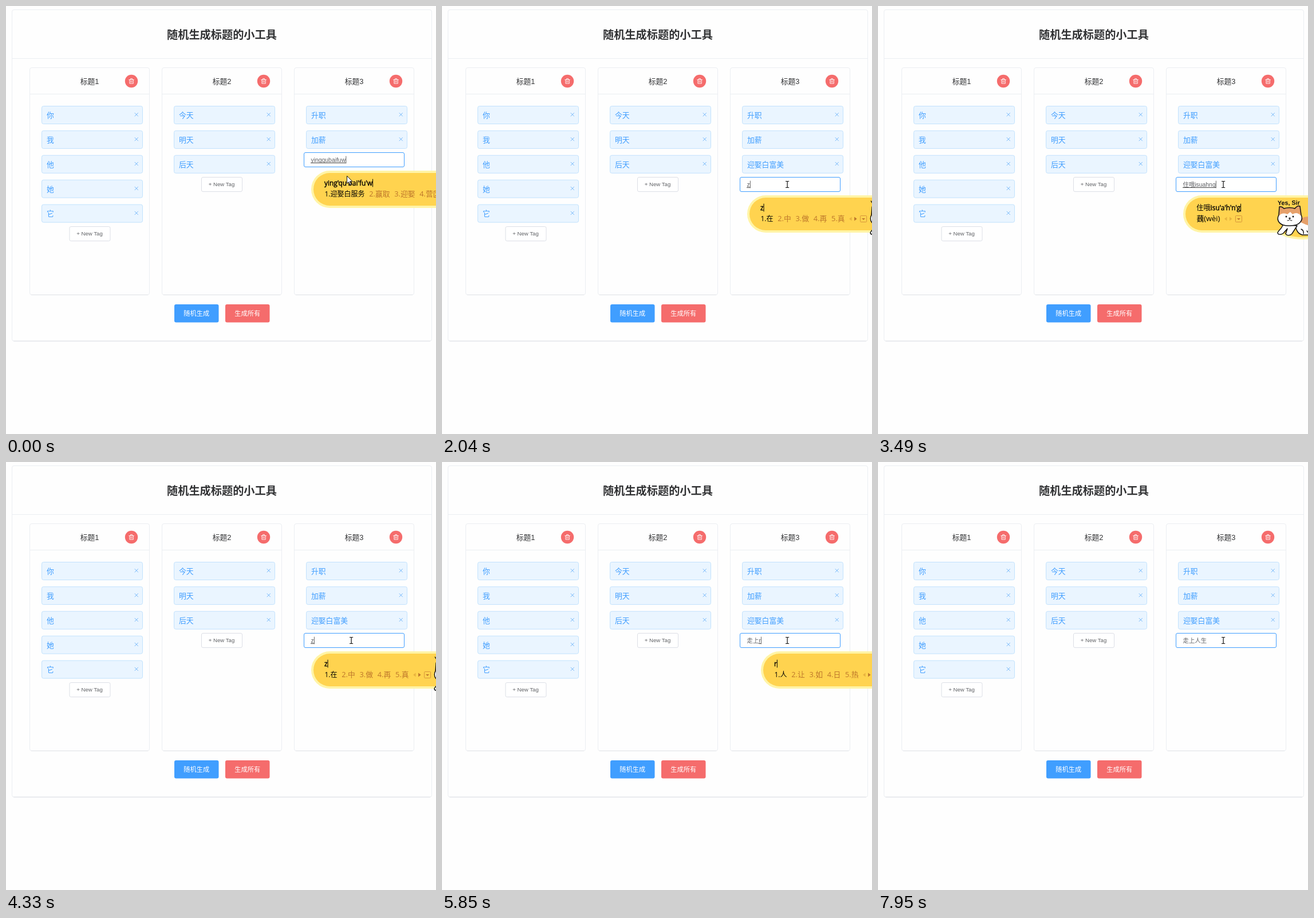
Recreate the animation shown at these times as an HTML page. Size 751 by 746 pixels, loop 8 s.

```html
<!DOCTYPE html>
<html lang="zh">
<head>
<meta charset="utf-8">
<style>
html, body { margin: 0; width: 100%; height: 100%; overflow: hidden; background: #fefefe; }
svg { display: block; width: 751px; height: 746px; }
text { font-family: "Liberation Sans", "Noto Sans CJK SC", "Noto Sans CJK", sans-serif; white-space: pre; }
.ime { font-family: "Open Sans", "Noto Sans CJK SC", "Noto Sans CJK", sans-serif; }
</style>
</head>
<body>
<svg viewBox="0 0 751 746"><g id="page"></g><g id="live"></g></svg>
<script>
const LOOP = 8000, BLUE = '#409eff', RED = '#f56c6c', GREY = '#606266', BROWN = '#bd762b';
const SANS = '"Liberation Sans","Noto Sans CJK SC","Noto Sans CJK",sans-serif';
const IME = '"Open Sans","Noto Sans CJK SC","Noto Sans CJK",sans-serif';

const pen = document.createElement('canvas').getContext('2d');
const width = (s, size, font) => (pen.font = `${size}px ${font}`, pen.measureText(s).width);
const mix = (a, b, k) => `color-mix(in srgb, ${b} ${k * 100}%, ${a})`;

const rect = (x, y, w, h, r, fill, stroke = 'none') =>
  `<rect x="${x}" y="${y}" width="${w}" height="${h}" rx="${r}" style="fill:${fill};stroke:${stroke}"/>`;
const text = (s, x, y, size, fill, more = '') =>
  `<text x="${x}" y="${y}" font-size="${size}" style="fill:${fill}" ${more}>${s}</text>`;
const path = (d, fill, stroke = 'none', w = 1) =>
  `<path d="${d}" fill="${fill}" stroke="${stroke}" stroke-width="${w}" stroke-linecap="round" stroke-linejoin="round"/>`;
const ellipse = (x, y, rx, ry, fill) => `<ellipse cx="${x}" cy="${y}" rx="${rx}" ry="${ry}" fill="${fill}"/>`;
const mid = 'text-anchor="middle"';

function card(x, y, w, h, head) {
  return rect(x, y, w, h, 3.5, 'none', '#ebeef2') +
    path(`M${x + 3} ${y + h}h${w - 6}`, 'none', '#dfe1e5') +
    path(`M${x} ${head}h${w}`, 'none', '#ebeef2');
}

function tag(label, x, row) {
  const y = 174.5 + row * 42.9;
  return rect(x, y, 176, 31, 3, '#eaf5ff', '#c2e2fd') +
    text(label, x + 8.5, y + 20.3, 12.8, BLUE) +
    path(`M${x + 162.5} ${y + 12}l5.5 5.5m0-5.5l-5.5 5.5`, 'none', '#69b1fa', .9);
}

function newTag(x, y, hover = 0) {
  return rect(x, y, 71, 25, 2.5, mix('#ffffff', '#ecf5ff', hover), mix('#dcdfe6', '#c6e2ff', hover)) +
    text('+ New Tag', x + 12.3, y + 15.8, 9.6, mix(GREY, BLUE, hover));
}

function column(i, tags) {
  const x = 41.5 + i * 231;
  return card(x, 107.5, 209, 396, 153.5) +
    text('标题' + (i + 1), x + 104.5, 135.6, 12.8, '#303133', mid) +
    `<circle cx="${x + 177.5}" cy="131" r="11.2" fill="${RED}"/>` +
    path(`M${x + 173.3} 128.5h8.6m-5.8 0v-2h3v2m-4.7 0v6.6h6.4v-6.6m-4.4 2v2.6m2.2-2.6v2.6`, 'none', '#fff', .9) +
    tags.map((s, row) => tag(s, x + 21, row)).join('');
}

page.innerHTML = card(10.5, 6.5, 733, 577.5, 91.5) +
  text('随机生成标题的小工具', 377, 57, 19.2, '#303133', mid + ' font-weight="700"') +
  column(0, ['你', '我', '他', '她', '它']) + newTag(111, 384.5) +
  column(1, ['今天', '明天', '后天']) + newTag(341.5, 298.5) +
  column(2, ['升职', '加薪']) +
  rect(294, 520, 77.5, 31.5, 3, BLUE) + text('随机生成', 332.7, 540, 11.2, '#fff', mid) +
  rect(383, 520, 77.5, 31.5, 3, RED) + text('生成所有', 421.7, 540, 11.2, '#fff', mid);

// Mascot at the right end of the input-method bubble
const dog =
  path('M728 378C738 371 746 368 762 368V399H741C734 397 730 392 728 378Z', '#fff', '#111', 1.5) +
  path('M731 374C740 368 748 366 762 367V384C750 384 742 378 731 374Z', '#e6a06a') +
  path('M707 381C706 388 700 390 698 395C698 399 704 399 708 396L715 388L712 397C714 401 720 400 723 397L732 383Z', '#fff', '#111', 1.5) +
  path('M700 364L701 350Q705 349 709 353Q719 350 728 353Q733 347 737 349L739 364C743 372 738 383 720 383C701 384 695 374 700 364Z', '#fff') +
  path('M700 364L701 350Q705 349 709 353Q719 350 728 353Q733 347 737 349L739 366Q732 358 724 363L720 359L715 363Q706 359 700 366Z', '#e6a06a') +
  path('M700 364L701 350Q705 349 709 353Q719 350 728 353Q733 347 737 349L739 364C743 372 738 383 720 383C701 384 695 374 700 364Z', 'none', '#111', 1.5) +
  ellipse(713, 367, 1.4, 1.6, '#111') + ellipse(725, 367, 1.4, 1.6, '#111') + ellipse(719, 370, 1.8, 1.3, '#111') +
  path('M715 374Q717 375 719 372Q721 375 723 374', 'none', '#111') +
  path('M739 389Q744 391 743 397M749 392L755 399', 'none', '#111', 1.4) +
  text('Yes, Sir', 698, 347, 10.8, '#111',
    'transform="rotate(-1 698 347)" font-weight="700" style="font-family:\'DejaVu Sans Mono\',monospace"');

function bubble(left, top, pinyin, words) {
  const x0 = left + 23, single = words.length < 2;
  const [, done, rest] = pinyin.match(/^([^a-z]*)(.*)$/);
  let x = x0 + .5, row = '';
  words.forEach((word, i) => {
    const size = i || single ? 12.8 : 12, person = word.endsWith('@');
    const label = (single ? '' : i + 1 + '.') + word.replace('@', '');
    row += text(label, x, top + 45.3, size, i ? BROWN : '#000', 'class="ime"');
    x += width(label, size, IME);
    if (person) {
      row += ellipse(x + 4, top + 35, 2, 2.2, BROWN) + path(`M${x + .5} ${top + 40}q0-3 3.5-3t3.5 3z`, BROWN);
      x += 7.5;
    }
    x += 7.7;
  });
  const y = top + 41, pale = '#e8b33f', next = single ? pale : BROWN;
  row += path(`M${x + 4.5} ${y - 3.5}v7l-4.5-3.5z`, pale) +
    path(`M${x + 9} ${y - 3.5}v7l4.5-3.5z`, next) +
    rect(x + 19.5, y - 5.5, 11, 11, 1, 'none', '#d6963a') +
    path(`M${x + 22} ${y - 1}h6l-3 3z`, BROWN);
  const shift = Math.max(0, x + 36 - 697), doneW = width(done, 12.4, IME);
  const end = x0 + doneW + width(rest, 11.8, IME) + .5;
  const spot = (rx, ry, fill) => ellipse(742 + shift, top + 53, rx, ry, fill);
  return rect(left, top, 320, 65, 32.5, '#fff4a6') + spot(50, 24, '#fff4a6') +
    rect(left + 4, top + 4, 312, 57, 28.5, '#ffd34f') + spot(46, 20, '#ffd34f') +
    text(done, x0, top + 25.5, 12.4, '#000', 'class="ime"') +
    text(rest, x0 + doneW, top + 25.5, 11.8, '#000', 'class="ime" stroke="#000" stroke-width=".4"') +
    path(`M${end} ${top + 15}v13`, 'none', '#000') + row +
    `<g transform="translate(${shift} ${top - 330})">${dog}</g>`;
}

function field(y, typed, pinyin, focus) {
  const comp = pinyin.replace(/'/g, ''), x = 532.5;
  const a = x + width(typed, 10.4, SANS), b = a + width(comp, 10.4, SANS);
  return rect(520.5, y + .5, 175, 25, 2.5, '#fff', mix('#dcdfe6', BLUE, focus)) +
    text(typed, x, y + 16.7, 10.4, GREY) + text(comp, a, y + 16.7, 10.4, GREY) +
    (comp && path(`M${a} ${y + 18.5}H${b}`, 'none', '#444') + path(`M${b + .7} ${y + 7}v12`, 'none', '#555', .9));
}

const arrow = path('M595.5 296.5v13l3-2.8 2.2 4.8 2-1-2.2-4.6h4.2z', '#fff', '#111', 1);
const hand = path('M599 317v-8q1.3-2 2.6 0v5l6 1.5q2 .6 1.6 3l-1.2 6h-6.5l-5.3-7q1-1.6 2.8-.5z', '#fff', '#111', 1);
const beam = path('M600.5 305.5h2l.6.8.6-.8h2M603.1 306v10M600.5 316.5h2l.6-.8.6.8h2', 'none', '#111', 1.2);

// time, settled text, pinyin being typed, candidates, bubble's left edge
const Z = '在 中 做 再 真', RS = '人生的 任胜大@ 人生 仁';
const steps = [
  [0, '', "ying'qu'bai'fu'w", '迎娶白服务 赢取 迎娶 营区 应'],
  [80, '', "ying'qu'bai'fu", '迎娶白富 赢取 迎娶 营区 应'],
  [330, '', "ying'qu'bai'fu'm", '迎娶白富美 赢取 迎娶 营区 应'],
  [480, '迎娶白富美'],
  [760, ''], [1230, ''], [1300, ''], [1370, ''], [1550, ''], [1610, ''], [1670, ''], [1730, ''],
  [2040, '', 'z', Z],
  [2220, '', 'zh', '这 中 找 真 只'],
  [2290, '', 'zhu', '住 主 注 祝 猪'],
  [2360, '', 'zhu', '住 主 祝 注 珠江'],
  [2430, '', 'zhuo', '桌 捉 着 卓 灼'],
  [2490, '', 'zhuo', '捉 桌 着 卓 住哦'],
  [2640, '', "zhuo'i'su", '捉 住哦 桌 着 卓'],
  [2760, '', "zhuo'i'su'a", '捉 住哦 桌 着 灼'],
  [2940, '', "zhuo'i'su'a'h", '捉 住哦 桌 着 灼'],
  [3220, '', "住哦isu'a'h", '蒍(wěi)'],
  [3280, '', "住哦isu'a'h'n", '蒍(wěi)'],
  [3490, '', "住哦isu'a'h'n'g", '蘶(wèi)'],
  [3580, '', "住哦isu'a'h'n", '蒍(wěi)'],
  [3670, '', "住哦isu'a'h", '蒍(wěi)'],
  [3860, '', "zhuo'i'su", '捉 住哦 桌 着 卓'],
  [3930, '', "zhuo'i's", '捉 住哦 桌 着 卓'],
  [4000, '', 'zhuo', '捉 桌 着 卓 住哦'],
  [4150, '', 'zhu', '住 主 注 祝 猪'],
  [4240, '', 'zh', '这 中 找 真 只'],
  [4330, '', 'z', Z],
  [4610, ''],
  [4860, '', 'z', Z],
  [4960, '', 'zo', '走 总 做 嘬 组'],
  [5060, '', 'zou', '走 揍 邹 奏 骤'],
  [5150, '', "zou'sh", '走时 走上 走 揍 邹', 539],
  [5360, '', "zou'sha", '走啥 揍啥 走 揍 邹', 539],
  [5450, '', "zou'shan", '走山 邹山 走 揍 邹', 539],
  [5540, '', "zou'shang", '走上 走伤 走 揍 邹', 539],
  [5630, '走上'],
  [5850, '走上', 'r', '人 让 如 日 热', 557],
  [6100, '走上', 're', '热 人 惹 任 认', 557],
  [6190, '走上', 'ren', '人 任 认 仁 忍', 557],
  [6280, '走上', "ren's", '人生 人数 人士 人 任', 557],
  [6370, '走上', "ren'sh", '人生 人数 人士 人 任', 557],
  [6460, '走上', "ren'shen", '人身 人参 人神 人 任', 557],
  [6550, '走上', "ren'sheng", '人生 人声 人 任 认', 557],
  [6640, '走上', "ren'sheng'd", RS, 557],
  [6790, '走上', "ren'sheng'd'd", '人生的 人生地 人生 人', 557],
  [6880, '走上', "ren'sheng'd'd", '人生的 人生大道 人生', 557],
  [7030, '走上', "ren'sheng'd'd'f", '人生的巅峰 人生 人声', 557],
  [7180, '走上人生的巅峰'], [7740, '走上人生的巅'], [7800, '走上人生的'], [7950, '走上人生']
];

function scene([t, typed, pinyin = '', words, left = 533]) {
  const y = t < 760 ? 255 : 298;
  const stage = (start, gap, n) => Math.max(0, Math.min(1, ((t - start) / gap + 1) / n));
  const third = t < 760 ? '' : tag('迎娶白富美', 524.5, 2);
  const entry = t >= 760 && t < 1550 ? newTag(572.5, 298.5, stage(1230, 70, 3))
    : field(y, typed, pinyin, t < 760 ? 1 : stage(1550, 60, 3));
  const pointer = t < 1230 ? arrow : t < 1730 ? hand : beam;
  return third + entry + (pinyin && bubble(left, y + 32, pinyin, words.split(' '))) + pointer;
}

let shown;
function draw(now) {
  const t = now % LOOP, step = steps.findLast(s => s[0] <= t);
  if (step !== shown) live.innerHTML = scene(shown = step);
  requestAnimationFrame(() => draw(performance.now()));
}
draw(0);
</script>
</body>
</html>
```
